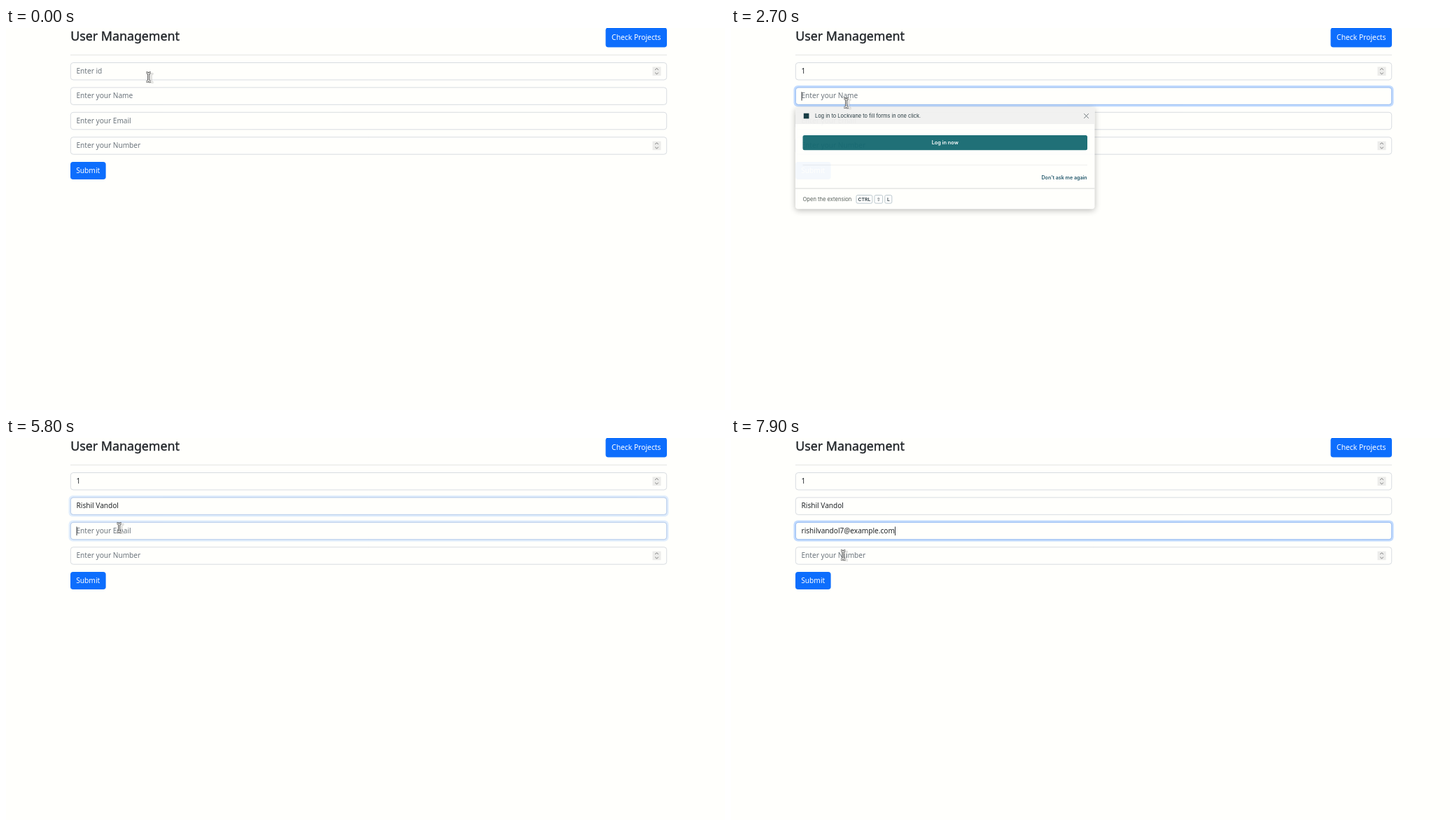
Recreate the animation shown at these times as an HTML page with a canvas. Size 1027 by 545 pixels, loop 8000 ms.

```html
<!DOCTYPE html>
<html lang="en">
<head>
<meta charset="utf-8">
<title>User Management</title>
<style>
  html, body { margin: 0; width: 100%; height: 100%; overflow: hidden; background: #fffffc; }
  canvas { display: block; width: 1027px; height: 545px; }
</style>
</head>
<body>
<canvas id="stage"></canvas>
<script>
const W = 1027, H = 545, LOOP = 8000, STEP = 100;
const PAGE = '#fffffc', BLUE = '#0d6efd', INK = '#212529', MUTED = '#6c757d';
const LEFT = 92.3, RIGHT = 943.7, PITCH = 35.4, TEXT_X = 100.5;
const SANS = '"Noto Sans", "Open Sans", sans-serif';
const UI = 'Inter, Roboto, sans-serif';
const BODY = '10.1px ' + SANS;

const NAME = 'Rishil Vandol', FIRST = 'Rishil', EMAIL = 'rishilvandol7@example.com';
const NAMES = ['Rudham', NAME, 'Rovant', 'Ronpal', 'Runal', FIRST];

const canvas = document.getElementById('stage');
const ctx = canvas.getContext('2d');
const dpr = window.devicePixelRatio || 1;
canvas.width = W * dpr;
canvas.height = H * dpr;

const clamp = v => Math.max(0, Math.min(1, v));
const between = (t, a, b) => t >= a && t < b;

// Latest value whose start time has passed
function latest(keys, t) {
  let value = keys[0][1];
  for (const [start, v] of keys) if (t >= start) value = v;
  return value;
}

const typed = [
  [[0, ''], [1400, '1']],
  [[0, ''], [3100, 'R'], [3500, 'Ri'], [3600, 'Ris'], [3800, 'Rish'],
   [3900, 'Rishi'], [4000, FIRST], [4900, NAME]],
  [[0, ''], [6300, 'r'], [6900, 'ri'], [7000, 'ris'], [7200, EMAIL]],
  [[0, '']]
];
const hints = ['Enter id', 'Enter your Name', 'Enter your Email', 'Enter your Number'];
const focusSpans = [[700, 2300], [2300, 5700], [5700, 9000], [9000, 9900]];
const popupAlpha = [[0, 0], [2600, 0.4], [2700, 0.96], [2800, 1], [2900, 0],
                    [6000, 0.6], [6100, 1], [6400, 0]];

// Pointer moves: start, end, target x, target y
const moves = [[200, 500, 202.5, 65], [1800, 2300, 165, 107], [5400, 5600, 162, 128],
               [7600, 7700, 161.5, 136], [7800, 7900, 160.5, 167]];

function pointerAt(t) {
  let x = 204, y = 70;
  for (const [a, b, tx, ty] of moves) {
    const k = clamp((t - a) / (b - a));
    x += (tx - x) * k;
    y += (ty - y) * k;
  }
  return [x, y];
}

function box(x, y, w, h, r, fill, stroke, lw = 0.8) {
  ctx.beginPath();
  ctx.roundRect(x, y, w, h, r);
  if (fill) { ctx.fillStyle = fill; ctx.fill(); }
  if (stroke) { ctx.strokeStyle = stroke; ctx.lineWidth = lw; ctx.stroke(); }
}

function text(s, x, y, font, color, align = 'left') {
  ctx.font = font;
  ctx.fillStyle = color;
  ctx.textAlign = align;
  ctx.fillText(s, x, y);
}

function line(points, color, lw) {
  ctx.beginPath();
  points.forEach(([x, y], i) => i ? ctx.lineTo(x, y) : ctx.moveTo(x, y));
  ctx.strokeStyle = color;
  ctx.lineWidth = lw;
  ctx.stroke();
}

function spinner(y) {
  box(923.5, y - 6.3, 12, 12.6, 0, '#ececea');
  for (const d of [-1, 1])
    line([[927.2, y + d * 1.9], [929.5, y + d * 4.2], [931.8, y + d * 1.9]], '#6f6f6f', 0.9);
}

function field(i, t) {
  const y = 49.5 + i * PITCH, w = RIGHT - LEFT, h = 24.5;
  const [on, off] = focusSpans[i];
  const focus = clamp((t - on) / 200) * (1 - clamp((t - off) / 200));
  if (focus) {
    ctx.globalAlpha = focus;
    box(LEFT - 2.8, y - 2.8, w + 5.6, h + 5.6, 6, '#c2dbfe');
    ctx.globalAlpha = 1;
  }
  box(LEFT, y, w, h, 3.8, PAGE, '#ced4da');
  if (focus) {
    ctx.globalAlpha = focus;
    box(LEFT, y, w, h, 3.8, null, '#86b7fe');
    ctx.globalAlpha = 1;
  }
  const value = latest(typed[i], t);
  text(value || hints[i], TEXT_X, y + 15.5, BODY, value ? INK : MUTED);
  if (focus && t < off) {
    const x = TEXT_X + ctx.measureText(value).width + 0.1;
    ctx.fillStyle = INK;
    ctx.fillRect(x, y + 6.2, 0.9, 12.5);
  }
  if (i % 3 === 0) spinner(y + 12.2);
}

function page(t) {
  ctx.fillStyle = PAGE;
  ctx.fillRect(0, 0, W, H);
  const title = 'User Management';
  text(title, 92.3, 17.8, '17.8px ' + SANS, INK);
  ctx.strokeStyle = INK;
  ctx.lineWidth = 0.4;
  ctx.strokeText(title, 92.3, 17.8);
  box(856.5, -0.5, 87.5, 28, 3.8, BLUE);
  text('Check Projects', 900.3, 17.2, '10.3px ' + SANS, '#fff', 'center');
  ctx.fillStyle = '#e1e2e1';
  ctx.fillRect(92, 38, 852, 0.9);
  hints.forEach((_, i) => field(i, t));
  box(92, 191, 50.6, 25, 3.8, BLUE);
  text('Submit', 117.2, 207.2, '10.2px ' + SANS, '#fff', 'center');
}

function key(x, w, label, font) {
  box(x, 238.5, w, 11.6, 2, '#fff', '#a9b9c0', 0.8);
  text(label, x + w / 2, 246.9, font, '#24343c', 'center');
}

function popupCard() {
  ctx.save();
  ctx.shadowColor = 'rgba(0,0,0,.28)';
  ctx.shadowBlur = 8 * dpr;
  ctx.shadowOffsetY = 2 * dpr;
  box(92, 113.5, 427.5, 144.8, 4, '#fffffd');
  ctx.restore();
  box(92, 113.5, 427.5, 23.6, [4, 4, 0, 0], '#f1f1f0');
  box(103.8, 121.7, 7.6, 7.6, 0, '#0e353d');
  text('Log in to Lockvane to fill forms in one click.', 120, 128.3, '7.4px ' + UI, '#20343b');
  line([[504.2, 122.2], [510.8, 128.8]], '#5c666a', 0.9);
  line([[510.8, 122.2], [504.2, 128.8]], '#5c666a', 0.9);
  box(102.5, 153, 406.5, 21.2, 2.5, '#166a72');
  text('Log in now', 305.7, 166.3, '600 7.3px ' + UI, '#fff', 'center');
  ctx.fillStyle = '#eeeeec';
  ctx.fillRect(102.5, 195, 406.5, 0.9);
  text("Don't ask me again", 508.7, 215.5, '600 7.1px ' + UI, '#1c5366', 'right');
  ctx.fillStyle = '#d9dbda';
  ctx.fillRect(92, 228.4, 427.5, 1.1);
  text('Open the extension', 102.5, 247, '7.6px ' + UI, '#525b55');
  key(179, 22.8, 'CTRL', '600 6.8px ' + UI);
  key(205, 11.6, '⇧', '7px "DejaVu Sans", sans-serif');
  key(219.8, 10, 'L', '600 6.8px ' + UI);
}

// The card is flattened first so that it fades as one sheet
const layer = document.createElement('canvas');
layer.width = canvas.width;
layer.height = canvas.height;

function popup(t) {
  const alpha = latest(popupAlpha, t);
  if (!alpha) return;
  const shift = t > 5000 ? 36 : 0;
  if (alpha === 1) {
    ctx.save();
    ctx.translate(0, shift);
    popupCard();
    ctx.restore();
    return;
  }
  const lc = layer.getContext('2d');
  const shot = () => { lc.clearRect(0, 0, layer.width, layer.height); lc.drawImage(canvas, 0, 0); };
  shot();
  ctx.save();
  ctx.translate(0, shift);
  popupCard();
  ctx.restore();
  ctx.globalAlpha = 1 - alpha;
  ctx.drawImage(layer, 0, 0, W, H);
  ctx.globalAlpha = 1;
}

function menu(top, items, picked) {
  const h = 3.6 + items.length * 13.15;
  ctx.fillStyle = 'rgba(51,51,46,.95)';
  ctx.fillRect(92, top, 852, h);
  ctx.strokeStyle = 'rgba(35,35,32,.6)';
  ctx.lineWidth = 0.8;
  ctx.strokeRect(92.4, top + 0.4, 851.2, h - 0.8);
  if (picked) {
    ctx.fillStyle = '#0d5fe6';
    ctx.fillRect(92.6, top + 1, 850.8, 14.4);
  }
  items.forEach((s, i) =>
    text(s, 96.8, top + 12.2 + i * 13.15, '9.35px ' + SANS, picked && !i ? '#e9effa' : '#bcbcb8'));
}

function menus(t) {
  if (between(t, 3400, 4900)) {
    const value = latest(typed[1], t);
    menu(109.3, NAMES.filter(n => n.startsWith(value)), t >= 4700);
  }
  if (between(t, 6500, 7500)) menu(144.7, [EMAIL], t >= 7000);
}

function beamPath(x, y) {
  ctx.beginPath();
  for (const d of [-1, 1]) {
    ctx.moveTo(x - 3.2, y + d * 6.2);
    ctx.quadraticCurveTo(x, y + d * 6.2, x, y + d * 4.2);
    ctx.quadraticCurveTo(x, y + d * 6.2, x + 3.2, y + d * 6.2);
  }
  ctx.moveTo(x, y - 4.6);
  ctx.lineTo(x, y + 4.6);
}

function beam(x, y) {
  const strokes = [[3.2, 1.4, 2.6, 'rgba(120,120,120,.4)'], [3.2, 1.4, 1.1, '#f4f4f2'],
                   [-0.4, 0, 3, '#4a4a4a'], [-0.4, 0, 1.2, '#f6f6f4']];
  for (const [dx, dy, lw, color] of strokes) {
    beamPath(x + dx, y + dy);
    ctx.lineWidth = lw;
    ctx.strokeStyle = color;
    ctx.stroke();
  }
}

function arrow(x, y) {
  const shape = [[0, 0], [0, 13], [2.9, 10.4], [4.9, 15], [7, 14], [5, 9.7], [8.8, 9.3]];
  const trace = (dx, dy) => {
    ctx.beginPath();
    shape.forEach(([px, py]) => ctx.lineTo(x + px + dx, y + py + dy));
    ctx.closePath();
  };
  trace(3, 1.5);
  ctx.fillStyle = 'rgba(0,0,0,.22)';
  ctx.fill();
  trace(0, 0);
  ctx.fillStyle = '#dededc';
  ctx.fill();
  ctx.lineWidth = 1;
  ctx.strokeStyle = '#3a3a3a';
  ctx.stroke();
}

function pointer(t) {
  const [x, y] = pointerAt(t);
  if (between(t, 3400, 4900) || between(t, 6500, 7200)) arrow(x - 1.8, y - 1.5);
  else beam(x, y);
}

function draw(now) {
  const t = Math.floor((now % LOOP) / STEP) * STEP;
  ctx.setTransform(dpr, 0, 0, dpr, 0, 0);
  page(t);
  popup(t);
  menus(t);
  pointer(t);
  requestAnimationFrame(frame);
}

let start = null;
function frame(now) {
  if (start === null) start = now;
  draw(Math.max(0, now - start));
}
requestAnimationFrame(frame);
</script>
</body>
</html>
```
